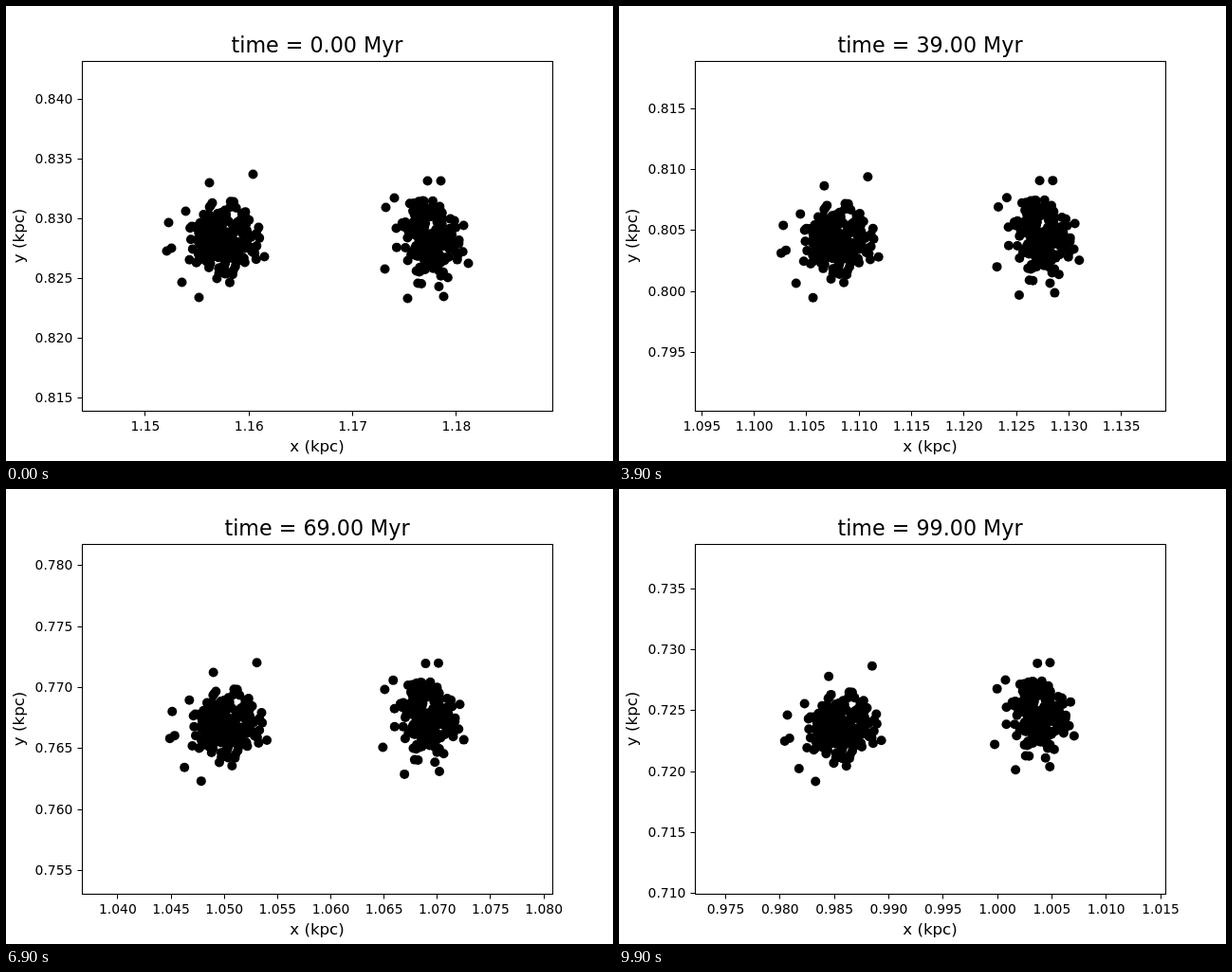
An HTML page with a canvas for the animation above (10 s loop, 640 px wide and 480 px high).

```html
<!DOCTYPE html>
<html>
<head>
<meta charset="utf-8">
<style>
html, body { margin: 0; width: 100%; height: 100%; overflow: hidden; background: #fff; }
canvas { display: block; }
</style>
</head>
<body>
<canvas id="stage" width="640" height="480"></canvas>
<script>
const ctx = document.getElementById('stage').getContext('2d');
const MID = { x: 328, y: 242.9 };

// View centre at a few key times: [Myr, x, y] in kpc
const PATH = [
  [0, 1.16656, 0.82848], [11, 1.16046, 0.8283], [23, 1.14723, 0.82204],
  [39, 1.11676, 0.8045], [51, 1.10261, 0.79574], [69, 1.05871, 0.76737],
  [83, 1.01083, 0.7357], [99, 0.9938, 0.72426]
];

// Each cluster is a bell-shaped cloud plus a few stray stars; all of it shears slowly
const CLUSTERS = [
  {
    x: 228, y: 246, sx: 16.5, sy: 19,
    strays: [[171, 228], [169, 258], [174, 255], [185, 291], [203, 307], [272, 264], [260, 177], [214, 186], [189, 216]],
    drift: (u, v) => [5 - 0.01 * u - 0.025 * v, 5 - 0.06 * u - 0.09 * v]
  },
  {
    x: 446, y: 247, sx: 15, sy: 21,
    strays: [[400, 212], [409, 202], [399, 277], [423, 308], [461, 306], [487, 271], [482, 231], [458, 184], [444, 184]],
    drift: (u, v) => [-5 - 0.05 * u - 0.025 * v, -7 - 0.04 * u - 0.1 * v]
  }
];

let seed = 7;
function random() {
  seed = (seed * 16807) % 2147483647;
  return seed / 2147483647;
}

function makeStars({ x, y, sx, sy, strays, drift }) {
  const offsets = strays.map(p => [p[0] - x, p[1] - y]);
  for (let i = 0; i < 210; i++) {
    const r = Math.sqrt(-2 * Math.log(1 - 0.95 * random()));
    const a = 2 * Math.PI * random();
    offsets.push([sx * r * Math.cos(a), sy * r * Math.sin(a)]);
  }
  return offsets.map(([u, v]) => [x + u + 0.5, y + v + 0.5, ...drift(u, v)]);
}

const stars = CLUSTERS.flatMap(makeStars);

function centreAt(t) {
  const i = Math.max(1, PATH.findIndex(p => p[0] >= t));
  const a = PATH[i - 1], b = PATH[i];
  const k = (t - a[0]) / (b[0] - a[0]);
  return [a[1] + k * (b[1] - a[1]), a[2] + k * (b[2] - a[2])];
}

function text(str, x, y, size, align = 'center') {
  ctx.font = size + 'px "DejaVu Sans", sans-serif';
  ctx.textAlign = align;
  ctx.fillText(str, x, y);
}

// Calls mark(value) for each multiple of step in the range
function eachTick(centre, half, step, mark) {
  for (let n = Math.ceil((centre - half) / step); n * step <= centre + half; n++) mark(n * step);
}

function draw(t) {
  const [cx, cy] = centreAt(t);
  const s = (PATH[0][1] - cx) / 0.17276;
  const scaleX = 10933 + 390 * s + 140 * s * s;
  const scaleY = 12620 + 800 * s - 580 * s * s;
  const halfX = 248 / scaleX, halfY = 184.8 / scaleY;

  ctx.fillStyle = '#fff';
  ctx.fillRect(0, 0, 640, 480);
  ctx.fillStyle = '#000';

  for (const [x, y, dx, dy] of stars) {
    ctx.beginPath();
    ctx.arc(x + dx * s, y + dy * s, 5, 0, 2 * Math.PI);
    ctx.fill();
  }

  ctx.lineWidth = 1.1;
  ctx.strokeRect(80.5, 58.5, 496, 369);

  const wide = 2 * halfX > 0.045;
  eachTick(cx, halfX, wide ? 0.01 : 0.005, v => {
    const p = MID.x + (v - cx) * scaleX;
    ctx.fillRect(Math.floor(p), 428, 1, 4.5);
    text(v.toFixed(wide ? 2 : 3), p, 448, 13.889);
  });
  eachTick(cy, halfY, 0.005, v => {
    const p = MID.y - (v - cy) * scaleY;
    ctx.fillRect(75.5, Math.round(p), 4.5, 1);
    text(v.toFixed(3), 70.3, Math.round(p + 5), 13.889, 'right');
  });

  text('time = ' + t.toFixed(2) + ' Myr', MID.x, 49, 22.222);
  text('x (kpc)', MID.x, 470, 16.667);
  ctx.save();
  ctx.translate(19, 242.4);
  ctx.rotate(-Math.PI / 2);
  text('y (kpc)', 0, 0, 16.667);
  ctx.restore();
}

const start = performance.now();
function tick() {
  const elapsed = Math.max(0, performance.now() - start) % 10000;
  draw(Math.floor(elapsed / 100));
  requestAnimationFrame(tick);
}
tick();
</script>
</body>
</html>
```
